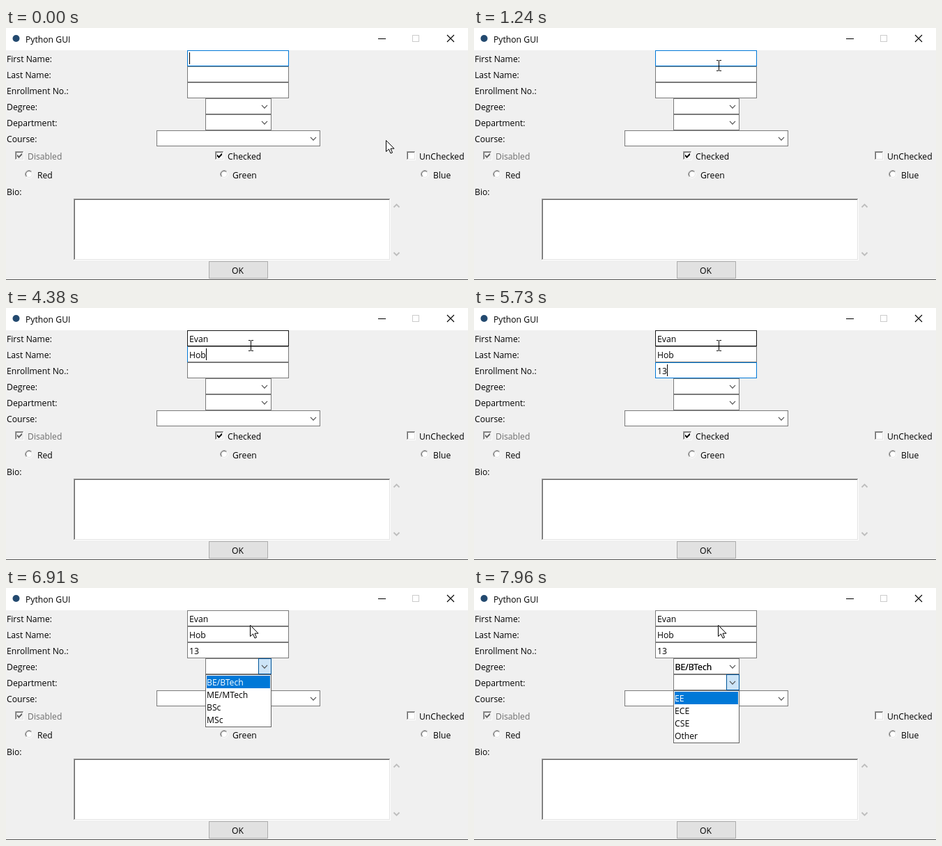
Recreate the animation shown at these times as an HTML page with a canvas. Size 663 by 362 pixels, loop 8 s.

```html
<!DOCTYPE html>
<html lang="en">
<head>
<meta charset="utf-8">
<title>Python GUI</title>
<style>
html, body { margin: 0; width: 100%; height: 100%; overflow: hidden; background: #f0f0f0; }
canvas { display: block; width: 663px; height: 362px; }
</style>
</head>
<body>
<canvas id="stage" width="663" height="362"></canvas>
<script>
const LOOP = 8000;
const BLUE = '#0078d7', GRAY = '#7a7a7a', HOVER = '#171717';
const FONT = '12.2px "Open Sans", "Noto Sans", sans-serif';
const ctx = document.getElementById('stage').getContext('2d');

// Entry rows: top edge, time of focus, time of blur, typed text and key times
const entries = [
  { y: 32, from: 0, to: 3400, text: 'Evan', keys: [2230, 2420, 3090, 3280] },
  { y: 55, from: 3400, to: 4870, text: 'Hob', keys: [4080, 4260, 4380] },
  { y: 78, from: 4870, to: 6040, text: '13', keys: [5680, 5730] }
];
const caretOff = [[370, 650], [1240, 1550], [2110, 2230], [3030, 3090], [4020, 4080], [5440, 5680]];
const popups = [
  { y: 124, from: 6910, to: 7340, items: ['BE/BTech', 'ME/MTech', 'BSc', 'MSc'] },
  { y: 147, from: 7960, to: LOOP, items: ['EE', 'ECE', 'CSE', 'Other'] }
];
const during = (t, a, b) => t >= a && t < b;

function fill(x, y, w, h, color) {
  ctx.fillStyle = color;
  ctx.fillRect(x, y, w, h);
}

function frame(x, y, w, h, edge, inside) {
  fill(x, y, w, h, edge);
  fill(x + 1, y + 1, w - 2, h - 2, inside);
}

function label(str, x, y, color = '#000') {
  ctx.fillStyle = color;
  ctx.fillText(str, x, y);
}

function line(points, color, width = 1) {
  ctx.beginPath();
  points.forEach(([x, y]) => ctx.lineTo(x, y));
  ctx.strokeStyle = color;
  ctx.lineWidth = width;
  ctx.stroke();
}

function chevron(x, y, dy, color, width) {
  line([[x - 4, y - dy], [x, y + dy], [x + 4, y - dy]], color, width);
}

function titleBar() {
  fill(0, 0, 663, 32, '#fff');
  ctx.beginPath();
  ctx.arc(14.5, 15, 5, 0, 7);
  ctx.fillStyle = '#23496f';
  ctx.fill();
  label('Python GUI', 28, 21);
  fill(534, 15, 11, 1, '#000');
  frame(583, 10, 10, 10, '#ccc', '#fff');
  line([[633, 10], [643, 20]], '#000', 1.1);
  line([[643, 10], [633, 20]], '#000', 1.1);
}

function sunken(x, y, w, h, inside) {
  fill(x, y, w, h, '#fff');
  fill(x, y, w - 1, h - 1, '#a0a0a0');
  fill(x + 1, y + 1, w - 2, h - 2, '#e3e3e3');
  fill(x + 1, y + 1, w - 3, h - 3, '#696969');
  fill(x + 2, y + 2, w - 4, h - 4, inside);
}

function checkbox(x, str, on, enabled) {
  const ink = enabled ? '#000' : '#6d6d6d';
  sunken(x, 177, 13, 13, enabled ? '#fff' : '#f0f0f0');
  if (on) {
    for (let i = 0; i < 7; i++) fill(x + 3 + i, 177 + 3 + Math.abs(i - 2) * -1 + 4, 1, 3, ink);
  }
  label(str, x + 18, 189, ink);
}

function radio(x, str) {
  const arc = (r, a, color) => {
    ctx.beginPath();
    ctx.arc(x + 6, 210, r, a, a + Math.PI);
    ctx.strokeStyle = color;
    ctx.lineWidth = 1;
    ctx.stroke();
  };
  ctx.beginPath();
  ctx.arc(x + 6, 210, 5, 0, 7);
  ctx.fillStyle = '#fff';
  ctx.fill();
  const a = Math.PI * 0.75;
  arc(5.4, a, '#a0a0a0');
  arc(4.5, a, '#696969');
  arc(5.4, a + Math.PI, '#fff');
  arc(4.5, a + Math.PI, '#e3e3e3');
  label(str, x + 18, 216);
}

function bioAndButton() {
  sunken(97, 245, 455, 89, '#fff');
  chevron(560.5, 255.5, -2, '#bdbdbd', 1.8);
  chevron(560.5, 324.5, 2, '#bdbdbd', 1.8);
  frame(291, 335, 85, 25, '#adadad', '#e1e1e1');
  label('OK', 324, 353);
  fill(0, 361, 663, 1, '#555');
}

function combo(x, y, w, { value = '', focus = false, open = false } = {}) {
  frame(x, y, w, 23, focus ? BLUE : GRAY, '#fff');
  if (focus) fill(x + 3, y + 3, w - 23, 17, BLUE);
  if (open) frame(x + w - 19, y, 19, 23, '#005499', '#cce4f7');
  chevron(x + w - 10, y + 12, 2.1, '#505050', 1.2);
  // Selected text is painted twice, which thickens it
  for (let i = 0; i < 2; i++) label(value, x + 2.5, y + 17, focus ? '#fff' : '#000');
}

function popup({ y, items }) {
  frame(286, y, 95, 76, '#646464', '#fff');
  fill(288, y + 2, 91, 18, BLUE);
  items.forEach((s, i) => label(s, 288, y + 16 + i * 18, i ? '#000' : '#fff'));
}

function pointerAt(t) {
  const k = Math.max(0, Math.min(7, Math.floor((t - 530) / 58.3) + 1)) / 7;
  const p = k * k * (3 - 2 * k);
  return { x: Math.round(545 - 195 * p), y: Math.round(161 - 108 * p) };
}

function entry(e, t, mouse, hot) {
  const active = during(t, e.from, e.to);
  const edge = active ? BLUE : hot ? HOVER : GRAY;
  // The middle row keeps a plain frame with only its left side lit
  frame(260, e.y, 146, 23, active && e.y === 55 ? GRAY : edge, '#fff');
  if (active) fill(260, e.y, 1, 23, BLUE);
  const typed = e.text.slice(0, e.keys.filter(k => t >= k).length);
  label(typed, 263, e.y + 17);
  if (active && !caretOff.some(([a, b]) => during(t, a, b))) {
    fill(263 + Math.round(ctx.measureText(typed).width), e.y + 3, 1, 17, '#000');
  }
}

function arrow({ x, y }) {
  ctx.beginPath();
  [[0, 0], [0, 16], [4, 12.5], [6.5, 18.5], [9, 17.5], [6.5, 11.7], [11.5, 11.7]]
    .forEach(([dx, dy]) => ctx.lineTo(x + 0.5 + dx, y + 0.5 + dy));
  ctx.closePath();
  ctx.fillStyle = '#fff';
  ctx.fill();
  ctx.strokeStyle = '#000';
  ctx.lineWidth = 1;
  ctx.stroke();
}

function beam({ x, y }) {
  const cx = x + 1;
  fill(cx, y - 6, 1, 14, '#000');
  for (const row of [y - 7, y + 8]) {
    fill(cx - 3, row, 3, 1, '#000');
    fill(cx + 1, row, 3, 1, '#000');
  }
}

function draw(t) {
  const list = popups.find(p => during(t, p.from, p.to));
  const mouse = pointerAt(t);
  const hot = list ? null : entries.find(e =>
    during(mouse.x, 260, 406) && during(mouse.y, e.y, e.y + 23));

  ctx.font = FONT;
  fill(0, 0, 663, 362, '#f0f0f0');
  titleBar();
  ['First Name:', 'Last Name:', 'Enrollment No.:', 'Degree:', 'Department:', 'Course:']
    .forEach((s, i) => label(s, 1, 49 + i * 23));
  label('Bio:', 1, 240);
  entries.forEach(e => entry(e, t, mouse, e === hot));

  combo(286, 101, 95, {
    value: t >= 7400 ? 'BE/BTech' : '',
    focus: during(t, 6040, 6910) || during(t, 7400, 7710),
    open: list === popups[0]
  });
  combo(286, 124, 95, { focus: during(t, 7710, 7960), open: list === popups[1] });
  combo(216, 147, 235);

  checkbox(13, 'Disabled', true, false);
  checkbox(300, 'Checked', true, true);
  checkbox(575, 'UnChecked', false, true);
  radio(27, 'Red');
  radio(307, 'Green');
  radio(595, 'Blue');
  bioAndButton();

  if (list) popup(list);
  if (hot) beam(mouse);
  else arrow(mouse);
}

const start = performance.now();
function tick() {
  draw((performance.now() - start) % LOOP);
  requestAnimationFrame(tick);
}
tick();
</script>
</body>
</html>
```
